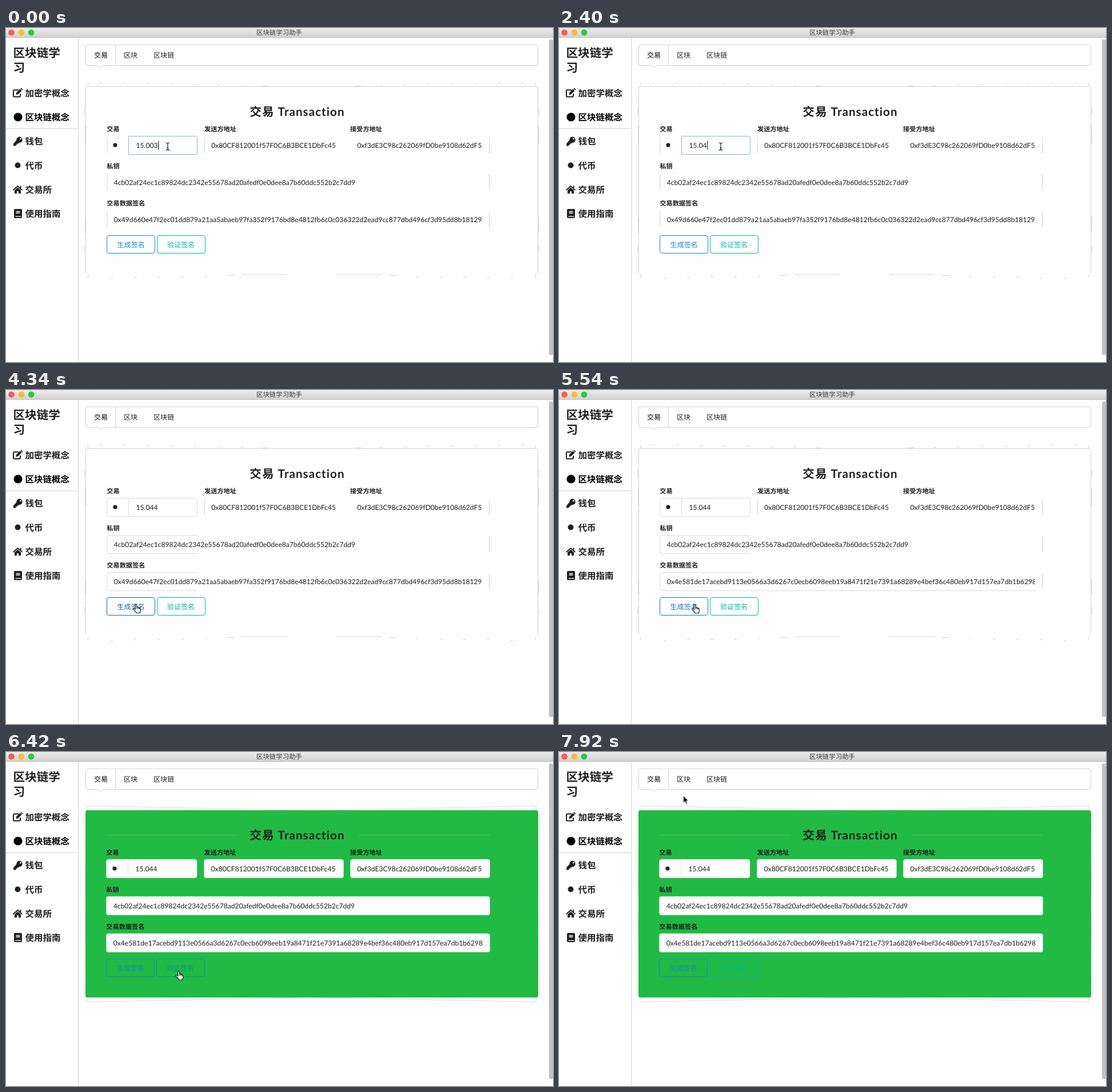
These frames come from a looping animation (957 by 585 pixels, 8 s). An HTML page:

```html
<!DOCTYPE html>
<html lang="zh-CN">
<head>
<meta charset="utf-8">
<title>区块链学习助手</title>
<style>
  html, body { margin: 0; width: 100%; height: 100%; overflow: hidden; background: #fefefe; }
  svg { display: block; font: 12.1px Lato, "Noto Sans CJK SC", "Noto Sans CJK", sans-serif; text-rendering: geometricPrecision; }
  text { fill: #1f1f1f; white-space: pre; }
  .line { fill: none; stroke: #d4d4d5; }
  .menu { font-weight: 700; font-size: 15.5px; }
  .brand { font-weight: 700; font-size: 20.6px; }
  .label { font-weight: 700; font-size: 11.2px; }
  .heading { font-weight: 700; font-size: 20.6px; letter-spacing: .05em; }
  .icon { fill: #1f1f1f; }
  .button { --c: #2185d0; }
  .button.teal { --c: #00b5ad; }
  .button.hover { --c: #1678c2; }
  .button.active { --c: #1a69a4; }
  .teal.hover { --c: #009c95; }
  .teal.active { --c: #00827c; }
  .button rect { fill: none; stroke: var(--c); }
  .button text { fill: var(--c); }
  .clip { width: 644px; }
  .valid .clip { width: 648px; }
  .valid .left { transform: translate(-1px, -1px); }
  .valid .mid { transform: translate(-.5px, -1px); }
  .valid .right { transform: translate(0, -1px); }
</style>
</head>
<body>
<svg id="stage" width="957" height="585" viewBox="0 0 957 585">
  <defs>
    <linearGradient id="bar" x2="0" y2="1"><stop stop-color="#ececec"/><stop offset="1" stop-color="#d0d0d0"/></linearGradient>
    <clipPath id="clip"><rect class="clip" x="189" y="180" height="200"/></clipPath>
  </defs>
  <rect width="957" height="585" fill="#fefefe"/>

  <!-- window bar -->
  <rect width="957" height="17" fill="url(#bar)"/>
  <path d="M0 16.5H957" stroke="#b9b9b9"/>
  <circle cx="9.5" cy="8" r="5.4" fill="#fc5b57"/>
  <circle cx="27" cy="8" r="5.4" fill="#fdbc2f"/>
  <circle cx="44" cy="8" r="5.4" fill="#29c940"/>
  <text x="438" y="12.2" font-size="11.45" style="fill:#3a3a3a">区块链学习助手</text>
  <rect x="950" y="20" width="7" height="553" rx="3.5" fill="#c1c1c1"/>

  <!-- sidebar -->
  <path class="line" d="M126.5 17V585M0 176.5H126"/>
  <text class="brand" x="12.5" y="50.5">区块链学<tspan x="12.5" y="76.5">习</tspan></text>
  <g id="menu" class="menu"></g>
  <g class="icon">
    <path d="M22 108.5H14.8q-1.8 0-1.8 1.8v8.4q0 1.8 1.8 1.8h8.4q1.8 0 1.8-1.8V115" fill="none" stroke="#1f1f1f" stroke-width="2"/>
    <path d="M17.5 117l.5-3.8 6.5-6.4 3 3-6.5 6.5zM25.2 106.1l1.3-1.1 2.9 2.9-1.1 1.3z"/>
    <circle cx="21" cy="156" r="7.6" fill="#000"/>
    <path fill-rule="evenodd" d="M18.4 196.5a5.2 5.2 0 1 1 4.6 4.4l-1.6 1.7h-2v2h-2v1.9H13v-4zM24 194a1.4 1.4 0 1 0 2.8 0 1.4 1.4 0 1 0-2.8 0z"/>
    <circle cx="20.5" cy="240.5" r="5"/>
    <path d="M12.5 284l8-7 8 7" fill="none" stroke="#1f1f1f" stroke-width="1.8"/>
    <path d="M15 284.3l5.5-4.7 5.5 4.7V290h-4v-4h-3v4h-4zM24.5 276.5h2v4h-2z"/>
    <rect x="14" y="317" width="14" height="16" rx="2"/>
    <path d="M17.5 321.5h7M17.5 324h7M16.5 330.2h10" stroke="#fefefe" stroke-width="1.3"/>
  </g>

  <!-- tabs -->
  <rect class="line" x="139.5" y="29.5" width="791" height="36" rx="3.5"/>
  <path class="line" d="M191.5 30V65"/>
  <path class="line" d="M161 65.5l5 4 5-4" style="fill:#fefefe"/>
  <path d="M161.5 65.5h9" stroke="#fefefe"/>
  <text x="154" y="52" style="fill:#000">交易</text>
  <text x="206" y="52">区块</text>
  <text x="258" y="52">区块链</text>

  <!-- plain card -->
  <g data-at="0 6420" class="line">
    <path d="M139.5 429V105.5q0-3 3-3H927.5q3 0 3 3V429"/>
    <path id="ticks"/>
    <use href="#ticks" transform="matrix(-1 0 0 1 1070 0)"/>
    <path d="M347.5 191V219M845.5 191V219M845.5 256V284M845.5 321V349"/>
    <path data-at="0 4190" d="M177 191V219M177 256V284M177 321V349"/>
    <path data-at="3290 4190" d="M249 254.5h46M249 286.5h46M249 319.5h46" opacity=".7"/>
    <path data-at="3440 4190" d="M226 351.5h36" opacity=".7"/>
    <path data-at="0 4190" d="M214.5 189.5H331.5q3 0 3 3V218.5q0 3-3 3H214.5z" stroke="#85b7d9"/>
    <g data-at="4190 6420" stroke="#dcdcdd">
      <rect x="176.5" y="189.5" width="158" height="32" rx="3.5"/>
      <path d="M214.5 190V221M335 254.5H180q-3.5 0-3.5 3.5V283q0 3.5 3.5 3.5H335M335 319.5H180q-3.5 0-3.5 3.5V348q0 3.5 3.5 3.5H335"/>
      <path data-at="4490 6420" d="M335 351.5H833"/>
    </g>
  </g>

  <!-- validated card -->
  <g data-at="6420 8000">
    <g fill="#fefefe" stroke="#dededf">
      <rect x="139.5" y="102.5" width="791" height="327" transform="rotate(1.2 535 266)"/>
      <rect x="139.5" y="102.5" width="791" height="327" transform="rotate(-1.2 535 266)"/>
    </g>
    <rect x="139" y="102" width="792" height="328" rx="3.5" fill="#21ba45"/>
    <path d="M176 145.5H405M617 145.5H846" stroke="#45c561"/>
    <g fill="#fefefe" stroke="#d0e6d4" stroke-width=".6">
      <rect x="175.5" y="188" width="158.5" height="32.5" rx="3.5"/>
      <rect x="346.5" y="188" width="244" height="32.5" rx="3.5"/>
      <rect x="602.5" y="188" width="244" height="32.5" rx="3.5"/>
      <rect x="175.5" y="253" width="671" height="32.5" rx="3.5"/>
      <rect x="175.5" y="318" width="671" height="32.5" rx="3.5"/>
    </g>
    <path d="M213.5 188V220.5" stroke="#e2e2e3"/>
  </g>

  <!-- form -->
  <g class="left">
    <text class="label" x="176.3" y="181.2">交易</text>
    <circle class="icon" cx="191" cy="205" r="3.6"/>
    <text id="amount" x="227.6" y="210"></text>
    <text class="label" x="176.3" y="246.2">私钥</text>
    <text x="188.8" y="275">4cb02af24ec1c89824dc2342e55678ad20afedf0e0dee8a7b60ddc552b2c7dd9</text>
    <text class="label" x="176.3" y="311.2">交易数据签名</text>
    <text id="signature" x="188.8" y="340" clip-path="url(#clip)"></text>
    <g id="sign" class="button">
      <rect x="176.5" y="363.5" width="84" height="31" rx="3.5"/>
      <text x="194.5" y="383.6">生成签名</text>
    </g>
    <g id="verify" class="button teal">
      <rect x="264.5" y="363.5" width="84" height="31" rx="3.5"/>
      <text x="282" y="383.6">验证签名</text>
    </g>
  </g>
  <g class="mid">
    <text class="label" x="347" y="181.2">发送方地址</text>
    <text x="359.2" y="210">0x80CF812001f57F0C6B3BCE1DbFc45</text>
  </g>
  <g class="right">
    <text class="heading" x="426.3" y="154">交易 Transaction</text>
    <text class="label" x="602" y="181.2">接受方地址</text>
    <text x="614.5" y="210" clip-path="url(#clip)">0xf3dE3C98c262069fD0be9108d62dF5</text>
  </g>
  <rect id="caret" y="198" width="1" height="15"/>

  <!-- pointers -->
  <g id="pointer">
    <path id="beam" d="M-3.5-6.5q3 0 3.5 1.5 .5-1.5 3.5-1.5M0-5.5V5.5M-3.5 6.5q3 0 3.5-1.5 .5 1.5 3.5 1.5M-1.8 2.5h3.6" fill="none" stroke="#111" stroke-width="1.1"/>
    <path id="arrow" d="M.6.8V13l2.8-2.6 2 4.6 2.2-.9-2-4.5h3.8z" stroke="#fff" stroke-width=".9"/>
    <path id="hand" d="M4.3 9.5V2q0-1.5 1.3-1.5T6.9 2v4q.3-1 1.4-.8t1.2 1.2q1.8-.5 2 1.1 1.8-.3 1.8 1.3v3q0 1-.8 2.2V16H5.6v-1.4L1 9.6q-.8-1.2.2-1.8t3.1 1.7zM7 6v3M9.4 6.5V9M11.5 7.6V9.5" fill="#fff" stroke="#111" stroke-width="1.1"/>
  </g>
</svg>
<script>
const LOOP = 8000;
const $ = id => document.getElementById(id);

const SIGNATURES = [
  [0, '0x49d660e47f2ec01dd879a21aa5abaeb97fa352f9176bd8e4812fb6c0c036322d2ead9cc877dbd496cf3d95dd8b18129'],
  [4490, '0x4e581de17acebd9113e0566a3d6267c0ecb6098eeb19a8471f21e7391a68289e4bef36c480eb917d157ea7db1b6298']
];
const AMOUNTS = [[0, '15.003'], [1050, '15.00'], [1350, '15.0'], [2400, '15.04'], [2700, '15.044']];
const CARET = [[0, 1], [450, 0], [900, 1], [1800, 0], [2250, 1], [3140, .5], [4190, 0]];
const SIGN = [[0, ''], [3440, 'hover'], [4190, 'active'], [4490, 'hover'], [5690, '']];
const VERIFY = [[0, ''], [5840, 'hover'], [6280, 'active'], [6420, 'hover'], [7470, '']];
const POINTER = [
  [0, 'beam', 283, 207.5], [3140, 'beam', 290, 218], [3290, 'beam', 257, 330],
  [3440, 'hand', 228, 363], [3590, 'hand', 224, 372], [3740, 'hand', 222, 374.5],
  [5540, 'hand', 232, 375], [5690, 'arrow', 262, 378], [5840, 'hand', 287, 381],
  [5990, 'hand', 296.5, 383], [7470, 'arrow', 280, 300], [7620, 'arrow', 237, 136],
  [7920, 'arrow', 217, 76]
];

// the entry in force at time t
const current = (track, t) => track.findLast(([start]) => start <= t);

['加密学概念', '区块链概念', '钱包', '代币', '交易所', '使用指南'].forEach((name, i) => {
  $('menu').innerHTML += `<text x="33.5" y="${119.6 + 42.3 * i}"${i === 1 ? ' style="fill:#000"' : ''}>${name}</text>`;
});

// broken outline of the tilted sheets, left half
function sheetTicks() {
  const dash = (far, near, y) => `M${535 - far} ${y}H${535 - near}`;
  let d = 'M143.5 96v6M143.5 432v6M137.5 139v14M138.5 171v32M138.5 331v28M137.5 380v13';
  for (let k = 0; k < 7; k++) {
    const x = 122 + 41.2 * k;
    d += dash(x + 2, x - 2, Math.round(101.6 - x * .0165) + .5);
    if (k < 5) d += dash(x + 65, x + 61, Math.round(430.4 + x * .02) + 2.5);
  }
  return d + dash(86, 76, 101.5) + dash(149, 135, 433.5) + dash(123, 43, 432);
}
$('ticks').setAttribute('d', sheetTicks());

const timed = [...document.querySelectorAll('[data-at]')].map(el => [el, ...el.dataset.at.split(' ').map(Number)]);

function draw(t) {
  for (const [el, from, to] of timed) el.style.display = t >= from && t < to ? '' : 'none';
  $('stage').classList.toggle('valid', t >= 6420);

  const amount = current(AMOUNTS, t)[1];
  $('amount').textContent = amount;
  $('signature').textContent = current(SIGNATURES, t)[1];
  $('caret').setAttribute('x', 252 + 7 * (amount.length - 4) + .3);
  $('caret').setAttribute('opacity', current(CARET, t)[1]);
  $('sign').setAttribute('class', 'button ' + current(SIGN, t)[1]);
  $('verify').setAttribute('class', 'button teal ' + current(VERIFY, t)[1]);

  const [, shape, x, y] = current(POINTER, t);
  for (const el of $('pointer').children) el.style.display = el.id === shape ? '' : 'none';
  $('pointer').setAttribute('transform', `translate(${x} ${y})`);
}

function tick() {
  draw(performance.now() % LOOP);
  requestAnimationFrame(tick);
}
tick();
</script>
</body>
</html>
```
